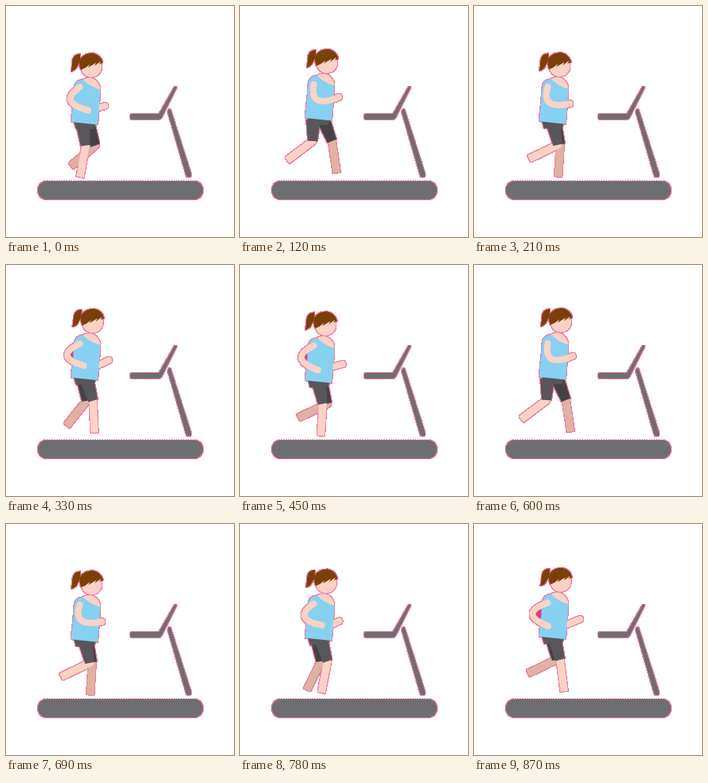
Recreate the animation shown at these times as an HTML page. Size 286x289 px, loop 900 ms.

```html
<!DOCTYPE html>
<html lang="en">
<head>
<meta charset="utf-8">
<title>Treadmill run</title>
<style>
  html, body { margin: 0; width: 100%; height: 100%; overflow: hidden; background: #fff; }
  svg { display: block; width: 100vw; height: 100vh; }
  .limb { fill: none; stroke-linejoin: round; }
  .leg { stroke-width: 9.5; }
  .arm { stroke-width: 8; stroke-linecap: round; }
  .light { stroke: #fbd2c6; }
  .shade { stroke: #e0b2a4; }
  .skin { fill: #fbd2c6; }
  .hair { fill: #7b3f08; }
  .pink { fill: #de3f7f; }
</style>
</head>
<body>
<svg viewBox="0 0 286 289">
  <defs>
    <!-- Crisp one-pixel outline around the silhouette -->
    <filter id="fringe" filterUnits="userSpaceOnUse" x="0" y="0" width="286" height="289" color-interpolation-filters="sRGB">
      <feComponentTransfer in="SourceAlpha" result="solid">
        <feFuncA type="discrete" tableValues="0 1"/>
      </feComponentTransfer>
      <feMorphology in="solid" operator="dilate" radius="1" result="grown"/>
      <feFlood flood-color="#e0447f" flood-opacity=".7"/>
      <feComposite in2="grown" operator="in" result="edge"/>
      <feMerge><feMergeNode in="edge"/><feMergeNode in="SourceGraphic"/></feMerge>
    </filter>
  </defs>

  <g fill="#6d6e71" filter="url(#fringe)">
    <rect x="40" y="219" width="207" height="23" rx="11.5"/>
    <path d="M159 135H192L211.500 101Q213.500 99.500 214 102L195 140Q193.500 142 191 142H159A3.500 3.500 0 0 1 159 135Z"/>
    <path d="M203 133Q203 129.500 205.500 129Q207 130 207.500 133L232.500 211Q232.500 214 230 214Q227 214.500 226 212Z"/>
  </g>
  <path d="M50 218.500H237" stroke="#fff" stroke-dasharray="1 2"/>

  <g filter="url(#fringe)">
    <path id="farArm" class="limb arm light"/>
    <path id="armGap" class="pink"/>
    <path id="legGap" class="pink"/>
    <path id="farLeg" class="limb leg shade"/>
    <path id="farShorts" fill="#454246"/>
    <path id="nearLeg" class="limb leg light"/>
    <path id="nearShorts" fill="#58565a"/>
    <g id="torso">
      <path fill="#58565a" d="M85 139L113 142L110 149L88 149Z"/>
      <path class="skin" d="M96 87.500Q102 83 110 86Q117 90 118.500 99L108 101Z"/>
      <path fill="#87d1f0" d="M97 87Q88 87.500 86 95Q84 103 84.500 112L81.500 140L115 143.500Q116.500 128 118.500 99.500Q112 98 106 94.500Q100 91 97 87Z"/>
    </g>
    <g id="head">
      <circle class="skin" cx="109" cy="71" r="13"/>
      <path class="hair" d="M95 55Q86 55 85 65Q85 71 83.500 77Q90 75 91.500 70Q96 65 95 55Z"/>
      <path class="hair" d="M96 75Q92 66 96 60Q102 53.500 111 54Q121 56 123.500 66L119 68L121 64L113 70L115 66L105 72L107 68Q102 73 96 75Z"/>
    </g>
    <path id="nearArm" class="limb arm light"/>
  </g>
</svg>
<script>
const LOOP = 900, STRIDE = 480, STEP = 30, SHIN = 40;
const el = id => document.getElementById(id);
const rad = deg => deg * Math.PI / 180;
const cos = deg => Math.cos(rad(deg));
const put = (id, d) => el(id).setAttribute("d", d);
const line = pts => "M" + pts.map(p => p.map(v => v.toFixed(2)).join(" ")).join("L");

// Knee sway and shin swing, each a cosine plus its overtone; angle is the stride phase
function legPose(angle, centre, sway, overtone, dy) {
  const knee = [
    centre + sway * cos(angle - 244) + overtone * cos(2 * angle + 35),
    169 + 1.1 * dy
  ];
  const shin = rad(-26 + 36.5 * cos(angle + 57) + 8.2 * cos(2 * angle - 117));
  const foot = [knee[0] + SHIN * Math.sin(shin), knee[1] + SHIN * Math.cos(shin)];
  const hip = [98 + (knee[0] - 103) / 2, 142 + dy];
  return { hip, knee, foot };
}

function drawLeg(name, { hip, knee, foot }) {
  put(name + "Leg", line([hip, knee, foot]));
  const dx = knee[0] - hip[0], dy = knee[1] - hip[1], len = Math.hypot(dx, dy);
  const nx = dy / len * 6, ny = -dx / len * 6;
  put(name + "Shorts", line([
    [hip[0] - 9, hip[1]], [hip[0] + 9, hip[1]],
    [knee[0] + nx, knee[1] + ny], [knee[0] - nx, knee[1] - ny]
  ]));
}

function drawArms(swing, dy) {
  const shoulder = [92.5, 98 + .7 * dy];
  const elbow = [86 + 12.5 * swing, 115 + 3 * swing + .9 * dy];
  const wrist = [109 + 16 * swing, 120 - 6.5 * swing + 1.6 * dy];
  // Bend the curve so that it passes through the elbow
  const bend = elbow.map((v, i) => 2 * v - (shoulder[i] + wrist[i]) / 2);
  const arm = `M${shoulder}Q${bend} ${wrist}`;
  put("nearArm", arm);
  put("armGap", arm + "Z");
  put("farArm", line([[106, 130], [119 - 14 * swing, 118 + 1.4 * dy]]));
}

function draw(ms) {
  const t = Math.floor(ms % LOOP / STEP) * STEP;
  const angle = t / STRIDE * 360;
  const sink = cos(angle) ** 2, dy = 5 * sink;
  el("torso").setAttribute("transform", `translate(0 ${dy})`);
  el("head").setAttribute("transform", `translate(${-2 * sink} ${dy})`);

  const near = legPose(angle, 102, 9.8, 2.6, dy);
  const far = legPose(angle + 180, 108.7, 7.5, 0, dy);
  drawLeg("far", far);
  drawLeg("near", near);

  // The legs enclose a gap only while the shins cross
  const crossed = (far.knee[0] - near.knee[0]) * (far.foot[0] - near.foot[0]) < 0;
  put("legGap", crossed ? line([[101, 145 + dy], far.knee, near.knee]) : "");

  drawArms(cos(angle - 112), dy);
}

const start = performance.now();
function tick() {
  draw(performance.now() - start);
  requestAnimationFrame(tick);
}
draw(0);
requestAnimationFrame(tick);
</script>
</body>
</html>
```
